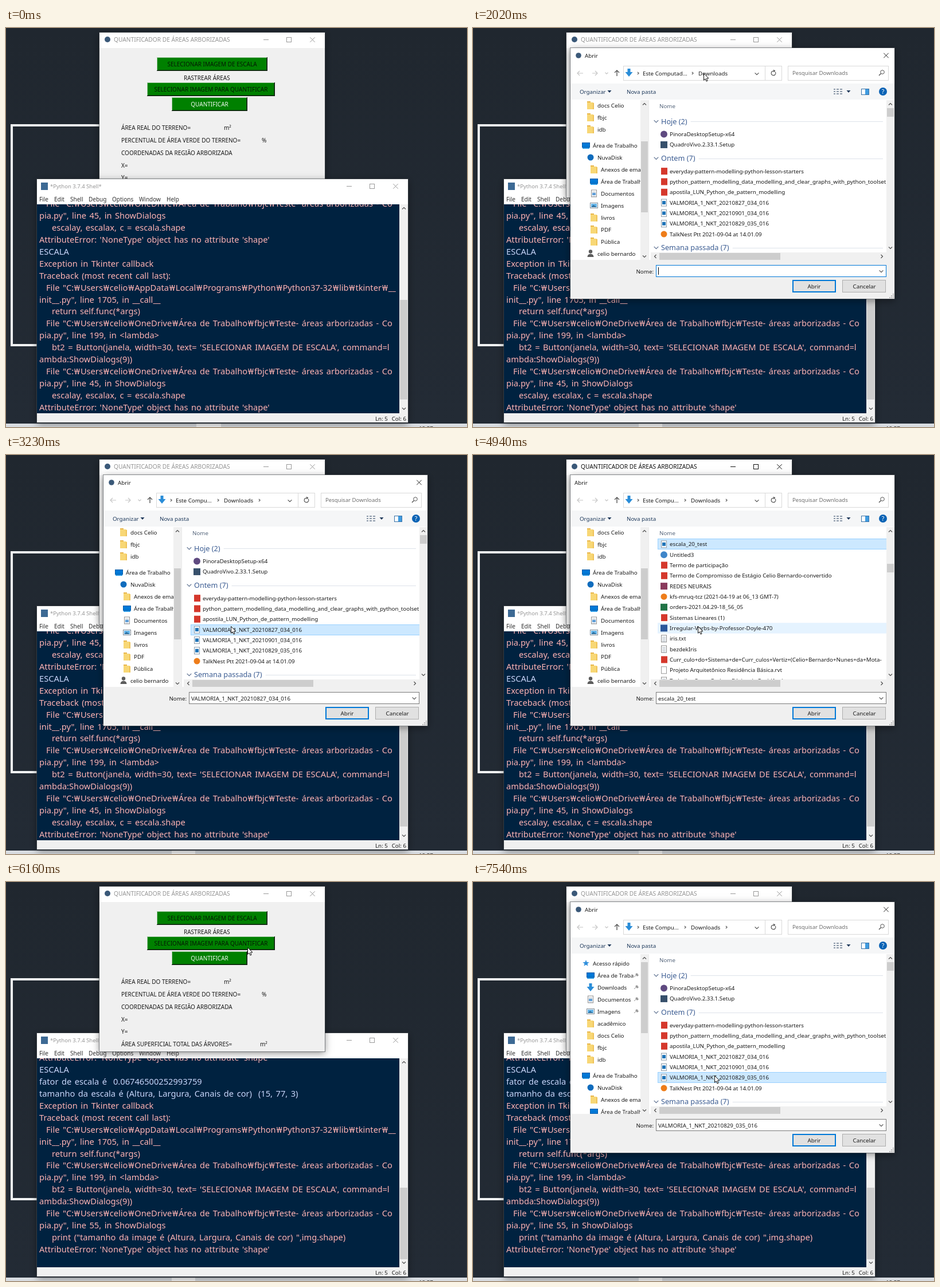
An HTML page with a canvas for the animation above (8 s loop, 804x697 px).

```html
<!DOCTYPE html>
<html lang="pt">
<head>
<meta charset="utf-8">
<title>Quantificador</title>
<style>
html, body { margin: 0; width: 100%; height: 100%; overflow: hidden; background: #212932; }
canvas { display: block; }
</style>
</head>
<body>
<canvas id="stage" width="804" height="697"></canvas>
<script>
const ctx = document.getElementById('stage').getContext('2d');
const LOOP = 8000;
const FONT = '"Noto Sans", "Open Sans", sans-serif';
const BLUE = '#0078d7';

// ---------- drawing helpers ----------
function rect(x, y, w, h, fill, stroke, lw = 1) {
  if (fill) { ctx.fillStyle = fill; ctx.fillRect(x, y, w, h); }
  if (stroke) {
    ctx.strokeStyle = stroke; ctx.lineWidth = lw;
    ctx.strokeRect(x + lw / 2, y + lw / 2, w - lw, h - lw);
  }
}
function line(points, color, lw = 1) {
  ctx.strokeStyle = color; ctx.lineWidth = lw;
  ctx.beginPath();
  points.forEach(([x, y], i) => i ? ctx.lineTo(x, y) : ctx.moveTo(x, y));
  ctx.stroke();
}
function poly(points, fill) {
  ctx.fillStyle = fill;
  ctx.beginPath();
  points.forEach(([x, y]) => ctx.lineTo(x, y));
  ctx.fill();
}
function disc(x, y, r, fill) {
  ctx.fillStyle = fill;
  ctx.beginPath(); ctx.arc(x, y, r, 0, 7); ctx.fill();
}
// y is the middle of the capitals
function text(s, x, y, size = 9.75, color = '#1a1a1a', align = 'left') {
  ctx.font = `${size}px ${FONT}`;
  ctx.fillStyle = color; ctx.textAlign = align;
  ctx.fillText(s, x, Math.round(y + size * 0.36));
}
function clip(x, y, w, h, draw) {
  ctx.save();
  ctx.beginPath(); ctx.rect(x, y, w, h); ctx.clip();
  draw();
  ctx.restore();
}
function panel(x, y, w, h, fill) {
  ctx.save();
  ctx.shadowColor = 'rgba(0,0,0,.45)'; ctx.shadowBlur = 12; ctx.shadowOffsetY = 3;
  rect(x, y, w, h, fill);
  ctx.restore();
  rect(x - 1, y - 1, w + 2, h + 2, null, 'rgba(70,75,80,.6)');
}
// dir: 0 right, 1 down, 2 left, 3 up
function chevron(x, y, dir, color = '#505050', s = 3, lw = 1.2) {
  ctx.save();
  ctx.translate(x, y); ctx.rotate(dir * Math.PI / 2);
  line([[-s / 2, -s], [s / 2, 0], [-s / 2, s]], color, lw);
  ctx.restore();
}
function caret(x, y, color) { poly([[x - 3.5, y - 2], [x + 3.5, y - 2], [x, y + 2]], color); }
function cross(x, y, color, s = 4.2) {
  line([[x - s, y - s], [x + s, y + s]], color);
  line([[x + s, y - s], [x - s, y + s]], color);
}
function controls(x, y, color) {
  rect(x - 4, y, 9, 1, color);
  rect(x + 36, y - 4, 9, 9, null, color);
  cross(x + 81.5, y + .5, color);
}

// ---------- small icons ----------
const icons = {
  folder(x, y) { rect(x - 6, y - 7, 6, 4, '#e8b64c'); rect(x - 6, y - 5, 11, 12, '#f8d775'); rect(x + 4, y - 4, 2, 11, '#eec25a'); },
  desk(x, y) { rect(x - 7, y - 5, 14, 9, BLUE, '#0a5ca8'); rect(x - 6, y + 4, 12, 2, '#2b9be8'); },
  page(x, y) { rect(x - 5, y - 6.5, 10, 13, '#fff', '#8d8d8d'); for (let i = -3; i < 5; i += 2.5) rect(x - 3, y + i, 6, 1, '#a9b4bf'); },
  blank(x, y) { rect(x - 5, y - 6.5, 10, 13, '#fff', '#999'); },
  doc(x, y) { icons.page(x, y); rect(x - 3, y - 1, 6, 4, '#5b9bd5'); },
  image(x, y) { rect(x - 5, y - 6.5, 10, 13, '#fff', '#8b9aa8'); rect(x - 3, y - 3, 6, 6, '#1f74b8'); },
  photo(x, y) { rect(x - 7, y - 5, 14, 10, '#fff', '#7d8a96'); rect(x - 5, y - 3, 10, 6, '#62b3e8'); poly([[x - 5, y + 3], [x - 1, y - 1], [x + 5, y + 3]], '#2c6f9e'); },
  down(x, y) { rect(x - 2.5, y - 7, 5, 7, '#2a8dd8'); poly([[x - 6.5, y - 1], [x + 6.5, y - 1], [x, y + 7]], '#2a8dd8'); },
  star(x, y) {
    const p = [];
    for (let i = 0; i < 10; i++) {
      const a = i * Math.PI / 5 - Math.PI / 2, r = i % 2 ? 2.6 : 6;
      p.push([x + r * Math.cos(a), y + r * Math.sin(a)]);
    }
    poly(p, '#2f8fdc');
  },
  user(x, y) { disc(x, y - 3.5, 3.2, '#5c5c5c'); ctx.beginPath(); ctx.arc(x, y + 6, 5.5, Math.PI, 0); ctx.fill(); },
  cloud(x, y) { disc(x, y, 5.5, '#0f6cbd'); },
  violet(x, y) { disc(x, y, 6, '#5f4a80'); },
  slate(x, y) { rect(x - 6, y - 6, 12, 12, '#37506b'); },
  red(x, y) { rect(x - 5, y - 6, 11, 12, '#d5382c'); },
  orange(x, y) { disc(x, y, 5.5, '#ee7d1a'); },
  azure(x, y) { disc(x, y, 6, '#3f86c9'); },
  plum(x, y) { rect(x - 6, y - 6, 12, 12, '#8a3a5c'); },
  green(x, y) { rect(x - 6, y - 6, 12, 12, '#217346'); },
  navy(x, y) { rect(x - 6, y - 6, 12, 12, '#2b579a'); }
};

// ---------- content ----------
const home = 'C:₩Users₩celio₩';
const script = [70, `File "${home}OneDrive₩Área de Trabalho₩fbjc₩Teste- áreas arborizadas - Co`];
const noShape = [58, "AttributeError: 'NoneType' object has no attribute 'shape'"];
const trace = (num, code) => [
  [58, 'Exception in Tkinter callback'],
  [58, 'Traceback (most recent call last):'],
  [70, `File "${home}AppData₩Local₩Programs₩Python₩Python37-32₩lib₩tkinter₩__`],
  [58, 'init__.py", line 1705, in __call__'],
  [80, 'return self.func(*args)'],
  script,
  [58, 'pia.py", line 199, in <lambda>'],
  [80, "bt2 = Button(janela, width=30, text= 'SELECIONAR IMAGEM DE ESCALA', command=l"],
  [58, 'ambda:ShowDialogs(9))'],
  script,
  [58, `pia.py", line ${num}, in ShowDialogs`],
  [80, code],
  noShape
];
const shape = 'escalay, escalax, c = escala.shape';
const log = [
  script, [58, 'pia.py", line 45, in ShowDialogs'], [80, shape], noShape,
  [58, 'ESCALA', 1], ...trace(45, shape),
  [58, 'ESCALA', 1],
  [58, 'fator de escala é  0.06746500252993759', 1],
  [58, 'tamanho da escala é (Altura, Largura, Canais de cor)  (15, 77, 3)', 1],
  ...trace(55, 'print ("tamanho da image é (Altura, Largura, Canais de cor) ",img.shape)')
];

const scene = (day, orbit) => `VALMORIA_1_NKT_2021${day}_${orbit}_016`;
const FIRST = scene('0827', '034'), LAST = scene('0829', '035'), SCALE = 'escala_20_test';
const files = [
  ['group', 'Hoje (2)'],
  ['violet', 'PinoraDesktopSetup-x64'],
  ['slate', 'QuadroVivo.2.33.1.Setup'],
  ['group', 'Ontem (7)'],
  ['red', 'everyday-pattern-modelling-python-lesson-starters'],
  ['red', 'python_pattern_modelling_data_modelling_and_clear_graphs_with_python_toolset'],
  ['red', 'apostila_LUN_Python_de_pattern_modelling'],
  ['image', FIRST],
  ['image', scene('0901', '034')],
  ['image', LAST],
  ['orange', 'TalkNest Ptt 2021-09-04 at 14.01.09'],
  ['group', 'Semana passada (7)'],
  ['image', SCALE],
  ['azure', 'Untitled3'],
  ['red', 'Termo de participação'],
  ['red', 'Termo de Compromisso de Estágio Celio Bernardo-convertido'],
  ['plum', 'REDES NEURAIS'],
  ['orange', 'kfs-mruq-tcz (2021-04-19 at 06_13 GMT-7)'],
  ['green', 'orders-2021.04.29-18_56_05'],
  ['red', 'Sistemas Lineares (1)'],
  ['navy', 'Irregular-Verbs-by-Professor-Doyle-470'],
  ['page', 'iris.txt'],
  ['page', 'bezdekIris'],
  ['red', 'Curr_culo+do+Sistema+de+Curr_culos+Vertiz+(Celio+Bernardo+Nunes+da+Mota-'],
  ['blank', 'Projeto Arquitetônico Residência Básica.rvt'],
  ['page', 'Trabalho Curso Redes - Básico da Residência']
];
let rowY = 140;
files.forEach((f, i) => {
  rowY += f[0] === 'group' ? (i ? 23.6 : 23) : files[i - 1][0] === 'group' ? 22.6 : 18.33;
  f.push(rowY);
});

const places = [
  ['star', 'Acesso rápido', 209], ['desk', 'Área de Traba', 217, 1], ['down', 'Downloads', 217, 1],
  ['doc', 'Documentos', 217, 1], ['photo', 'Imagens', 217, 1], ['folder', 'acadêmico', 217],
  ['folder', 'docs Celio', 217], ['folder', 'fbjc', 217], ['folder', 'idb', 217],
  ['desk', 'Área de Trabalho', 209], ['cloud', 'NuvaDisk', 217], ['folder', 'Anexos de email', 223],
  ['desk', 'Área de Trabalho', 223], ['doc', 'Documentos', 223], ['photo', 'Imagens', 223],
  ['folder', 'livros', 223], ['folder', 'PDF', 223], ['folder', 'Pública', 223], ['user', 'celio bernardo', 217]
];

// ---------- timing ----------
// start, end, steps, x, y
const moves = [
  [200, 330, 3, 412, 90], [590, 590, 1, 405, 84], [990, 1060, 2, 400, 74], [1130, 1200, 2, 403, 76],
  [1400, 1540, 3, 408, 70], [1950, 2210, 5, 392, 93], [2280, 2480, 4, 392, 152], [2550, 3010, 8, 392, 299],
  [5090, 5820, 11, 421, 114], [6300, 6780, 8, 421, 334], [6850, 7110, 5, 421, 378], [7180, 7380, 4, 421, 338]
];
function pointer(t) {
  let x = 710, y = 630;
  for (const [a, b, n, tx, ty] of moves) {
    if (t < a) break;
    const p = Math.min(1, (Math.floor((t - a) * (n - 1) / (b - a || 1) + 0.1) + 1) / n);
    x += (tx - x) * p; y += (ty - y) * p;
  }
  return [Math.round(x), Math.round(y)];
}
// value of the last entry whose time has come
const at = (t, list) => list.reduce((v, [start, value]) => t >= start ? value : v, list[0][1]);
const between = (t, a, b) => t >= a && t < b;

function state(t) {
  const [mx, my] = pointer(t);
  return {
    mx, my,
    pointing: t >= 130,
    raised: t >= 1740,
    active: between(t, 1740, 1880) || between(t, 4940, 6090),
    dialog: between(t, 1950, 5090) || t >= 6230,
    closing: between(t, 4940, 5090),
    loading: between(t, 1950, 2280) || between(t, 6230, 6440),
    name: at(t, [[0, ''], [3160, FIRST], [3820, SCALE], [6000, ''], [7470, LAST]]),
    scroll: at(t, [[0, 0], [3760, 62], [3820, 105], [3880, 178], [3950, 250.5], [6000, 0]]),
    side: t < 6000 ? 133 : 0,
    lines: at(t, [[0, 18], [5160, 21], [5290, log.length]]),
    top: at(t, [[0, 0], [5160, 4], [5290, 17]])
  };
}

// ---------- parts ----------
function desktop(s) {
  const g = ctx.createLinearGradient(0, 0, 0, 690);
  g.addColorStop(0, '#20272f'); g.addColorStop(1, '#232b35');
  rect(0, 0, 804, 697, g);
  rect(8, 168, 388, 388, null, '#f2f4f5', 4);
  rect(0, 691, 804, 6, '#d8dce1');
  rect(s.raised ? 289 : 332, 691, s.raised ? 41 : 43, 6, '#f7f8f9');
  text('18:57', 720, 699, 9.75);
}

function button(label, x, y, w, color) {
  rect(x, y, w, 24, '#008000');
  rect(x, y, w, 1, '#a9cfa9'); rect(x, y, 1, 24, '#a9cfa9');
  rect(x + 1, y + 22, w - 1, 1, '#004800'); rect(x + w - 2, y + 1, 1, 22, '#004800');
  rect(x, y + 23, w, 1, '#101810'); rect(x + w - 1, y, 1, 24, '#101810');
  text(label, x + w / 2, y + 12, 10, color, 'center');
}

function mainWindow(s) {
  panel(163, 8, 393, 288, '#f0f0f0');
  rect(163, 8, 393, 27, '#fff');
  disc(177, 20, 5, '#3a5878');
  text('QUANTIFICADOR DE ÁREAS ARBORIZADAS', 188, 20.5, 10.2, s.active ? '#111' : '#959595');
  controls(453, 20, s.active ? '#111' : '#999');
  button('SELECIONAR IMAGEM DE ESCALA', 263, 51, 193, '#041804');
  text('RASTREAR ÁREAS', 310, 87, 10);
  button('SELECIONAR IMAGEM PARA QUANTIFICAR', 246, 95, 223, '#041804');
  button('QUANTIFICAR', 289, 121, 132, '#f2f8f2');
  ['ÁREA REAL DO TERRENO=', 'PERCENTUAL DE ÁREA VERDE DO TERRENO=', 'COORDENADAS DA REGIÃO ARBORIZADA',
    'X=', 'Y=', 'ÁREA SUPERFICIAL TOTAL DAS ÁRVORES='].forEach((l, i) => text(l, 201, 174.5 + i * 21.8, 10));
  text('m²', 380, 174.5, 10);
  text('%', 446, 196, 10);
  text('m²', 443, 283.5, 10);
}

// the won sign stands for the path separator and sits in a wider cell
function logLine(str, x, y, color) {
  ctx.font = `14.65px ${FONT}`;
  ctx.fillStyle = color; ctx.textAlign = 'left';
  str.split(/(₩)/).forEach(part => {
    const pad = part === '₩' ? 1 : 0;
    ctx.fillText(part, x + pad, y);
    x += ctx.measureText(part).width + 2 * pad;
  });
}

function shell(s) {
  panel(54, 264, 647, 425, '#fff');
  rect(61, 270, 12, 13, '#3d6a94');
  text('*Python 3.7.4 Shell*', 77, 277, 9.5, '#959595');
  controls(598, 276, '#999');
  [['File', 58], ['Edit', 84], ['Shell', 112], ['Debug', 144], ['Options', 185], ['Window', 232], ['Help', 280]]
    .forEach(([m, x]) => text(m, x, 299, 10, '#333'));
  rect(54, 308, 632, 365, '#002240');
  clip(54, 308, 632, 364, () => {
    ctx.wordSpacing = '1.7px';
    for (let i = s.top; i < s.lines; i++) {
      const [x, str, out] = log[i];
      logLine(str, x, Math.round(312 + (i - s.top) * 20.94), out ? '#c9d6fa' : '#ffb3b3');
    }
  });
  rect(686, 308, 15, 365, '#f0f0f0');
  const k = s.top / 17;
  rect(687, 475 + 59 * k, 13, 174 - 49 * k, '#cdcdcd');
  chevron(694, 315, 3); chevron(694, 665, 1);
  rect(54, 673, 647, 16, '#f0f0f0');
  text('Ln: 5', 644, 682, 9.75);
  text('Col: 6', 698, 682, 9.75, '#1a1a1a', 'right');
}

function sidebar(s) {
  clip(170, 126, 122, 279, () => places.forEach(([icon, label, x, pin], i) => {
    const y = 142 + i * 21 + (i > 8 ? 7 : 0) - s.side;
    icons[icon](x - 12, y);
    text(label, x, y);
    if (pin) { line([[281, y + 3], [285, y - 1]], '#8a8a8a'); poly([[283, y - 2], [286, y - 4], [289, y], [286, y + 2]], '#9a9a9a'); }
  }));
  rect(292, 126, 14, 279, '#f0f0f0');
  rect(293, s.side ? 198 : 140, 12, 124, '#cdcdcd');
  chevron(299, 133, 3); chevron(299, 399, 1);
  rect(306, 126, 1, 279, '#ececec');
}

function fileList(s) {
  text('Nome', 325, 136, 9.75, '#56667c');
  clip(308, 146, 413, 246, () => files.forEach(([icon, label, base]) => {
    const y = base - s.scroll, group = icon === 'group';
    const over = s.mx > 310 && s.mx < 721 && s.my >= 146 && s.my < 392 && Math.abs(s.my - y) < (group ? 11.5 : 9.15);
    const x = group ? 310 : 322, h = group ? 20 : 18.5;
    if (label === s.name) rect(x, Math.round(y - 9.5), 400, 19, '#cce8ff', '#99d1ff');
    else if (over) rect(x, y - h / 2, 721 - x, h, '#e5f3ff');
    if (group) {
      chevron(319.5, y, 1, '#5b6f8f', 3.8);
      text(label, 328, y, 12.7, '#3b5c92');
      const end = 334 + ctx.measureText(label).width;
      rect(end, Math.round(y), 715 - end, 1, '#dde2ea');
    } else {
      icons[icon](333, y);
      text(label, 343, y);
    }
  }));
  rect(721, 126, 14, 266, '#f0f0f0');
  rect(722, 140 + s.scroll / 5, 12, 15, '#cdcdcd');
  chevron(728, 133, 3); chevron(728, 384, 1);
  rect(310, 392, 425, 13, '#f0f0f0');
  rect(325, 393, 211, 12, '#cdcdcd');
  chevron(318, 399, 2); chevron(713, 399, 0);
}

function navigation(s) {
  line([[192, 79], [182, 79]], '#c4c4c4'); chevron(184, 79, 2, '#c4c4c4', 4);
  line([[208, 79], [217, 79]], '#c4c4c4'); chevron(215, 79, 0, '#c4c4c4', 4);
  chevron(233, 79, 1, '#c4c4c4', 2.5);
  line([[251, 75], [251, 84]], '#555', 1.4); chevron(251, 76, 3, '#555', 4, 1.4);
  rect(262, 66, 277, 26, '#fff', '#d9d9d9');
  rect(509, 67, 1, 24, '#d9d9d9');
  icons.down(272, 78);
  chevron(288, 79, 0, '#555', 2.2);
  const x = s.loading ? 393 : 380;
  text(s.loading ? 'Este Computad...' : 'Este Compu...', 296, 79);
  chevron(x - 10, 79, 0, '#555', 2.2);
  text('Downloads', x, 79);
  if (!s.loading) chevron(442, 79, 0, '#555', 2.2);
  chevron(495, 80, 1, '#555', 3.4);
  ctx.strokeStyle = '#555'; ctx.lineWidth = 1.3;
  ctx.beginPath(); ctx.arc(524, 79, 3.8, -.6, 4.6); ctx.stroke();
  poly([[524, 72.5], [524, 77.5], [527.5, 75]], '#555');
  rect(549, 66, 176, 26, '#fff', '#d9d9d9');
  text('Pesquisar Downloads', 557, 79, 9.6, '#6d6d6d');
  ctx.strokeStyle = '#555';
  ctx.beginPath(); ctx.arc(714, 77, 3.3, 0, 7); ctx.stroke();
  line([[711.5, 79.5], [708, 83]], '#555', 1.4);
}

function toolbar() {
  rect(170, 97, 565, 28, '#f5f6f7');
  text('Organizar', 186, 111, 9.75, '#1e395b'); caret(238, 111, '#1e395b');
  text('Nova pasta', 268, 111, 9.75, '#1e395b');
  for (let i = 0; i < 3; i++) {
    rect(629, 106 + i * 4, 3, 2, '#8b98a8');
    rect(634, 106 + i * 4, 4, 2, '#8b98a8'); rect(640, 106 + i * 4, 4, 2, '#8b98a8');
  }
  caret(655, 111, '#1e395b');
  rect(677, 106, 14, 11, '#fff', '#3973a8'); rect(684, 107, 6, 9, '#3f9be0');
  disc(715, 111, 7, '#0b63b5');
  text('?', 715, 111, 10.5, '#fff', 'center');
}

function dialog(s) {
  panel(170, 35, 565, 438, '#fff');
  if (!s.closing) {
    disc(184, 48, 4.8, '#3a5878');
    cross(720.5, 48, '#222');
  }
  text('Abrir', s.closing ? 177 : 195, 48);
  navigation(s);
  toolbar();
  sidebar(s);
  fileList(s);
  rect(170, 405, 565, 68, '#f0f0f0');
  text('Nome:', 315, 425, 9.75, '#1a1a1a', 'right');
  rect(319, 414, 402, 21, '#fff', s.name ? '#7a7a7a' : BLUE);
  chevron(712, 425, 1, '#555', 3.4);
  if (s.name) text(s.name, 323, 425);
  else rect(323, 418, 1, 13, '#000');
  rect(557, 440, 76, 22, '#e1e1e1', BLUE, 2);
  text('Abrir', 595, 451, 9.75, '#1a1a1a', 'center');
  rect(644, 440, 76, 22, '#e1e1e1', '#adadad');
  text('Cancelar', 682.5, 451, 9.75, '#1a1a1a', 'center');
  for (let i = 0; i < 3; i++) for (let j = 0; j <= i; j++) rect(732 - j * 3, 464 + i * 3, 2, 2, '#b5b5b5');
}

function cursor(x, y) {
  const p = [[0, 0], [0, 11.8], [2.7, 9.3], [4.5, 13.6], [6.5, 12.7], [4.8, 8.6], [8.5, 8.4]].map(([a, b]) => [x + .5 + a, y + .5 + b]);
  poly(p, '#fff');
  ctx.lineJoin = 'round';
  line([...p, p[0]], '#111');
  ctx.lineJoin = 'miter';
}

function draw(t) {
  const s = state(t);
  desktop(s);
  const order = s.raised ? [shell, mainWindow] : [mainWindow, shell];
  order.forEach(part => part(s));
  if (s.dialog) dialog(s);
  if (s.pointing) cursor(s.mx, s.my);
}

const began = performance.now();
function tick() {
  draw((performance.now() - began) % LOOP);
  requestAnimationFrame(tick);
}
tick();
</script>
</body>
</html>
```
